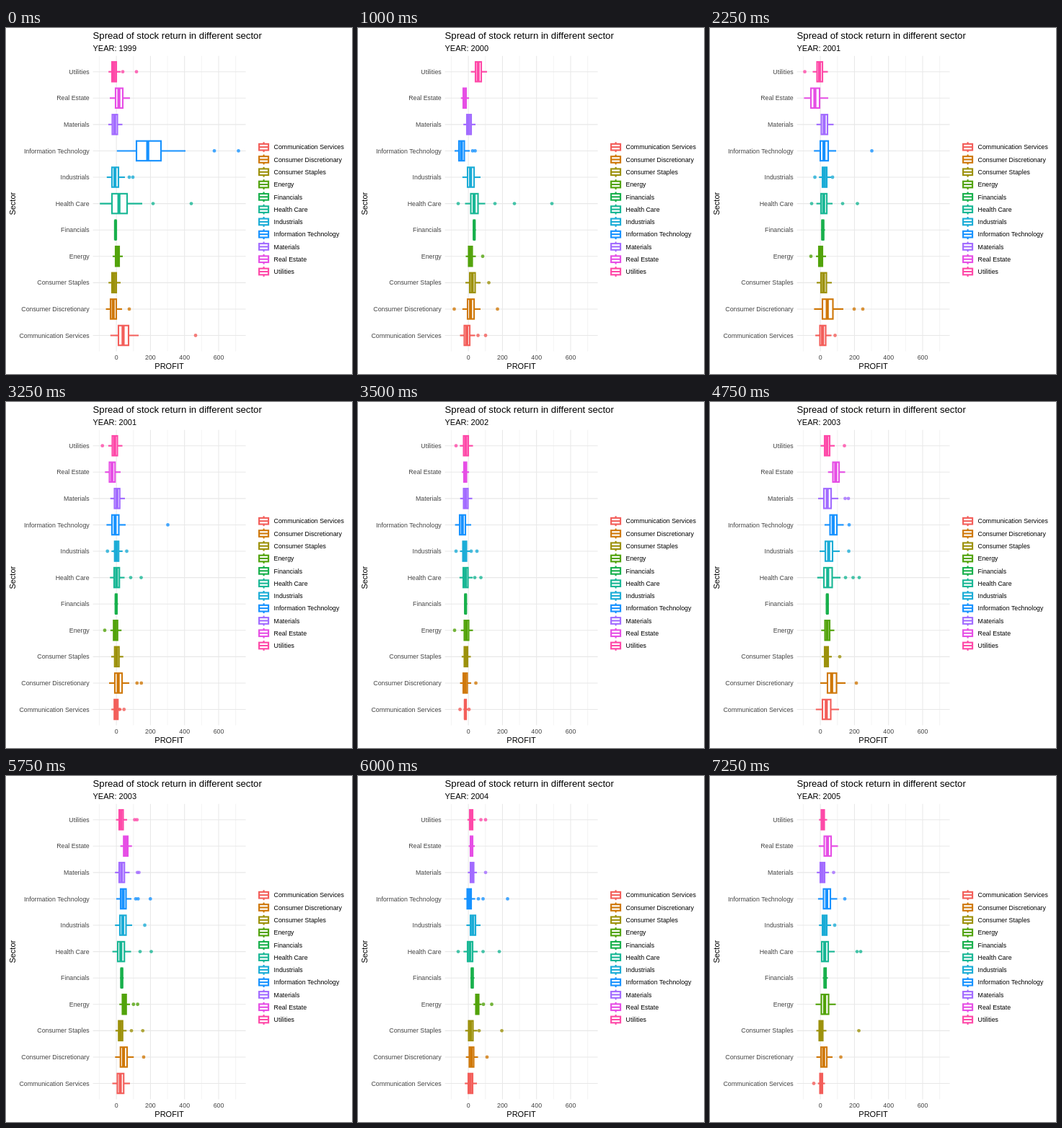
Recreate the animation shown at these times as an HTML page. Size 480 by 480 pixels, loop 8 s.

```html
<!DOCTYPE html>
<html lang="en">
<head>
<meta charset="utf-8">
<title>Spread of stock return</title>
<style>
html, body { margin: 0; width: 100%; height: 100%; overflow: hidden; background: #fff; }
svg { display: block; width: 480px; height: 480px; font: 8.8px "Liberation Sans", Arial, sans-serif; }
</style>
</head>
<body>
<svg viewBox="0 0 480 480">
  <g id="grid" stroke="#e8e8e8"></g>
  <g id="boxes" stroke-width="2.13"></g>
  <g id="axes" fill="#444"></g>
  <g id="legend" stroke-width="2.13"></g>
  <text x="120.5" y="15" font-size="13.2">Spread of stock return in different sector</text>
  <text id="year" x="120.5" y="31.6" font-size="11"></text>
  <text x="226.5" y="473" font-size="11" text-anchor="middle">PROFIT</text>
  <text transform="translate(13.3 243.7) rotate(-90)" font-size="11" text-anchor="middle">Sector</text>
</svg>
<script>
const el = id => document.getElementById(id);
const STATE = 1250, HOLD = 1000, LOOP = 8000, FIRST_YEAR = 1999;
const LEFT = 120.6, RIGHT = 332.6, TOP = 38.8, BOTTOM = 448.4, ROW = 36.58;
const profitX = v => 153.1 + v * 0.2365;
const rowY = i => 426.5 - i * ROW;

// Key points per year, in stage x: both quartiles, then the outliers.
// Median and whiskers follow from the quartiles.
const MEDIAN = 0.46, LOW_REACH = 0.8, HIGH_REACH = 1;
const sectors = [];
const sector = (name, color, ...years) => sectors.push({ name, color, years });

sector("Communication Services", "#f35e5a", [156, 170, 263], [147.5, 155, 166.5, 177],
  [152.5, 160.5, 173.5], [148, 150, 141.5, 154], [156, 167.5], [153, 159], [152.5, 156, 144]);
sector("Consumer Discretionary", "#cf7809", [145, 153, 171], [152, 161, 133.5, 193.5],
  [156, 170.5, 200, 212], [146, 151.5, 163.5], [163, 175.5, 203], [154.5, 160.5, 179], [154, 162, 181.5]);
sector("Consumer Staples", "#9c910b", [147, 153], [155, 162.5, 181.5],
  [154, 161.5], [147.5, 152], [159, 164, 180], [153.5, 159.5, 168, 199.5], [151.5, 156.5, 206.5]);
sector("Energy", "#52a30b", [152, 157], [153.5, 158.5, 173],
  [151, 156, 140], [147.5, 153.5, 134], [159.5, 166], [163.5, 167.5, 174, 185.5], [154.5, 164.5]);
sector("Financials", "#18b04c", [151.5, 152.5], [160.5, 162],
  [155.5, 157.5], [148.5, 150], [162, 163.5], [157.5, 159.5], [158.5, 161]);
sector("Health Care", "#19b795", [147, 168, 204, 257], [156.5, 166.5, 139, 190, 217, 269],
  [154, 162, 141, 184, 204.5], [146, 152.5, 162, 170.5], [158, 169.5, 188, 198.5, 207],
  [152, 159, 139, 173.5, 196], [155, 164, 204, 209]);
sector("Industrials", "#1bacd6", [147, 156, 171, 176], [152, 161],
  [156, 162, 145.5, 170], [145.5, 150.5, 136, 157, 165], [160, 170, 192.5], [156, 163], [156, 162, 173]);
sector("Information Technology", "#1792ff", [181, 215, 289, 322.5], [140, 147.5, 159, 162.5],
  [153, 164, 224.5], [141, 149], [166.5, 176, 193], [151.5, 157, 167, 173.5, 207.5], [157.5, 167, 187]);
sector("Materials", "#a26bff", [147.5, 154.5], [151, 157],
  [154.5, 163], [146.5, 152.5], [158, 168, 187.5, 192], [156, 160.5, 177], [153, 159, 171.5]);
sector("Real Estate", "#e64ee5", [152, 162], [146, 150],
  [140, 152], [147, 150.5], [170.5, 179], [156, 159], [158.5, 168]);
sector("Utilities", "#fe49a8", [147, 153, 162, 181], [163, 171],
  [148.5, 156, 131.5], [146.5, 153, 136], [159, 166, 186.5], [155, 159, 170.5, 177], [154.5, 158.5]);

const line = (x1, y1, x2, y2, w) =>
  `<path d="M${x1} ${y1}L${x2} ${y2}"${w ? ` stroke-width="${w}"` : ""}/>`;
const rect = (x, y, w, h) => `<rect x="${x}" y="${y}" width="${w}" height="${h}" fill="#fff"/>`;
const dot = (x, y, color) =>
  `<circle cx="${x}" cy="${y}" r="2.4" fill="${color}" stroke="none" opacity=".8"/>`;
const label = (x, y, text, anchor) => `<text x="${x}" y="${y}" text-anchor="${anchor}">${text}</text>`;

const mean = list => list.reduce((sum, v) => sum + v, 0) / list.length;

// Spread a list over n places; an empty one gathers at the mean of the other
const stretch = (list, other, n) => Array.from({ length: n }, (_, i) =>
  list.length ? list[Math.floor(i * list.length / n)] : mean(other));

function blend([a1, a3, ...outA], [b1, b3, ...outB], p) {
  const n = Math.max(outA.length, outB.length);
  const to = [b1, b3, ...stretch(outB, outA, n)];
  return [a1, a3, ...stretch(outA, outB, n)].map((v, i) => v + (to[i] - v) * p);
}

function boxplot([q1, q3, ...outliers], y, color) {
  const half = ROW * 0.375, range = q3 - q1, median = q1 + range * MEDIAN;
  return `<g stroke="${color}">` +
    outliers.map(x => dot(x, y, color)).join("") +
    line(q1 - range * LOW_REACH, y, q3 + range * HIGH_REACH, y) +
    rect(q1, y - half, range, 2 * half) +
    line(median, y - half, median, y + half, 4.27) + "</g>";
}

function legendKey(x, y, color) {
  return `<g stroke="${color}">` + line(x, y - 6.9, x, y + 6.9) +
    rect(x - 6.48, y - 4.32, 12.96, 8.64) + line(x - 6.48, y, x + 6.48, y) + "</g>";
}

function drawFixed() {
  let grid = "", axes = "", legend = "";
  for (let v = -100; v <= 700; v += 100) {
    const x = profitX(v), major = v % 200 === 0;
    grid += line(x, TOP, x, BOTTOM, major ? 1.07 : 0.53);
    if (major) axes += label(x, 460, v, "middle");
  }
  sectors.forEach(({ name, color }, i) => {
    const y = rowY(i), keyY = 165.2 + i * 17.28;
    grid += line(LEFT, y, RIGHT, y, 1.07);
    axes += label(115.7, y + 3.1, name, "end");
    legend += legendKey(357.6, keyY, color) + label(371.6, keyY + 3.2, name, "start");
  });
  el("grid").innerHTML = grid;
  el("axes").innerHTML = axes;
  el("legend").innerHTML = legend;
}

function drawYear(state, p) {
  el("year").textContent = "YEAR: " + (FIRST_YEAR + state);
  el("boxes").innerHTML = sectors.map(({ color, years }, i) =>
    boxplot(p ? blend(years[state], years[state + 1], p) : years[state], rowY(i), color)).join("");
}

const start = performance.now();
let shown;
function frame() {
  const t = (performance.now() - start) % LOOP + STATE - HOLD;
  const state = Math.floor(t / STATE);
  const p = t % STATE < HOLD ? 0 : 0.5; // a single halfway step between years
  if (shown !== state + p) drawYear(state, p);
  shown = state + p;
  requestAnimationFrame(frame);
}

drawFixed();
frame();
</script>
</body>
</html>
```
